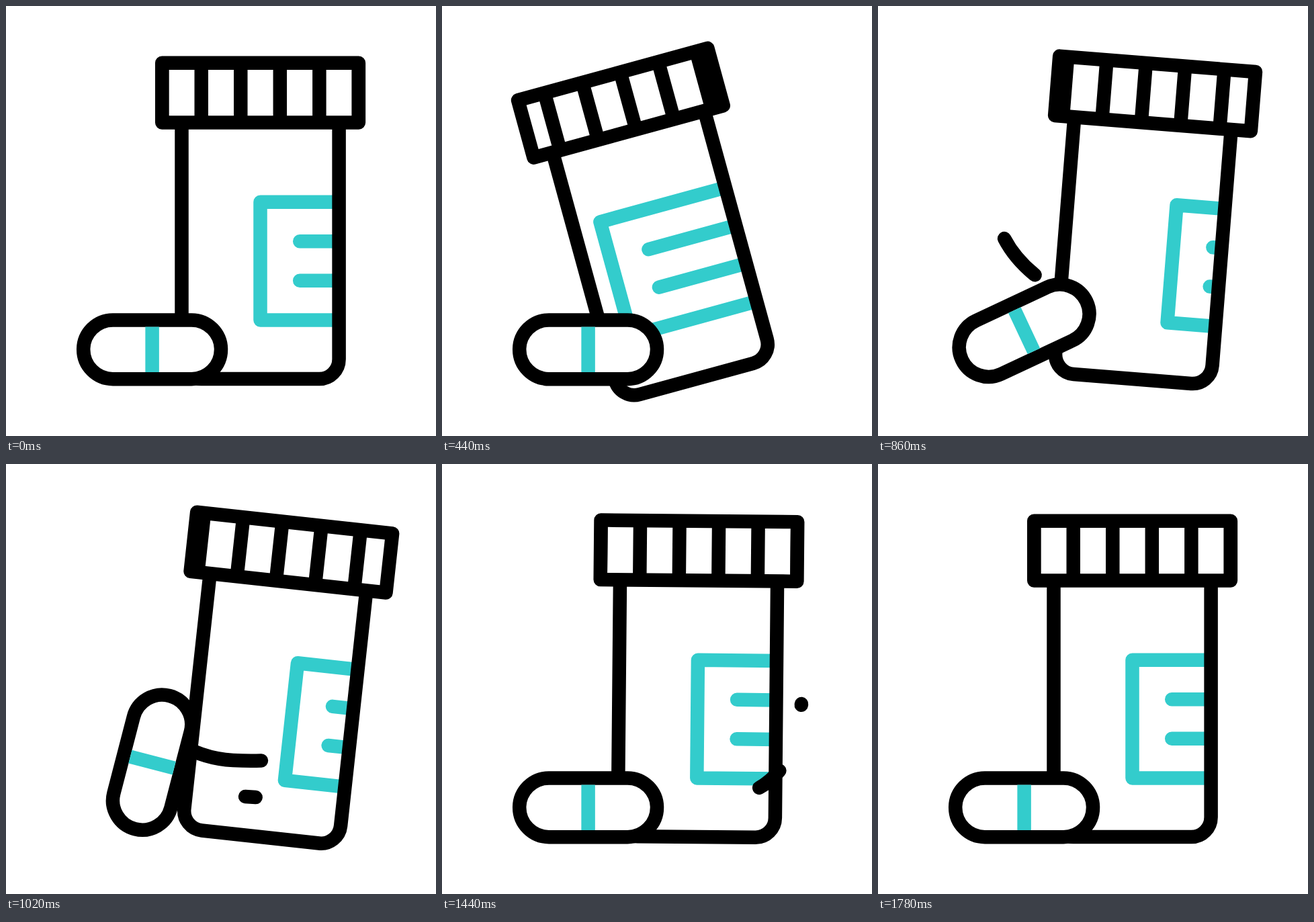
Write an HTML page that moves like this. It is 640 px wide and 640 px high and loops after 2400 ms.

```html
<!DOCTYPE html>
<html lang="en">
<head>
<meta charset="utf-8">
<title>Pill bottle</title>
<style>
  html, body { margin: 0; width: 100%; height: 100%; overflow: hidden; background: #fff; }
  svg { display: block; width: 100vw; height: 100vh; }
  svg * { fill: none; stroke: #000; stroke-width: 20.5; stroke-linejoin: round; }
  svg .teal, .teal * { stroke: #33cccc; }
  .round { stroke-linecap: round; }
</style>
</head>
<body>
<svg viewBox="0 0 640 640">
  <clipPath id="inBody"><rect x="261" y="180" width="235" height="370"/></clipPath>
  <clipPath id="inCap"><rect x="232" y="84" width="293" height="90"/></clipPath>

  <g id="bottle">
    <g clip-path="url(#inBody)">
      <g id="label" class="teal">
        <path d="M680 291.8H378.5V467.4H680"/>
        <path class="round" d="M437.2 350.3H680M437.2 408.8H680"/>
      </g>
    </g>
    <path d="M261.5 173.5V525.7a29.3 29.3 0 0 0 29.3 29.3H466.3a29.3 29.3 0 0 0 29.3-29.3V173.5"/>
    <g clip-path="url(#inCap)"><path id="stripes"/></g>
    <rect x="232.2" y="84.8" width="292.7" height="88.6"/>
  </g>

  <path id="upper" class="round" pathLength="1"
    d="M188 346C200 369 215 385 232 399C262 423 298 439 338 441C400 444 472 438 515 399Q532 383 535 357"/>
  <path id="lower" class="round" pathLength="1"
    d="M356 495Q392 498 427 495.500Q452 492 472 482Q490 472 506 452"/>

  <g id="pill">
    <rect x="-102.4" y="-43.9" width="204.8" height="87.8" rx="43.9" style="fill:#fff"/>
    <path class="teal" d="M0-33.800V33.800"/>
  </g>
</svg>
<script>
const LOOP = 2400, GAP = 58.54;
const el = id => document.getElementById(id);

// Value at time t of a track of [time, value] keys, eased in and out between them
function track(t, keys) {
  if (t <= keys[0][0]) return keys[0][1];
  for (let i = 1; i < keys.length; i++) {
    const [t0, a] = keys[i - 1], [t1, b] = keys[i];
    if (t < t1) {
      const s = (t - t0) / (t1 - t0);
      return a + (b - a) * s * s * (3 - 2 * s);
    }
  }
  return keys[keys.length - 1][1];
}

const tilt = [[10, 0], [579, -18], [944, 8], [1263, -4], [1526, 2], [1780, 0]];
const labelX = [[10, 0], [568, -87.8], [928, 58.5], [1210, -65], [1440, 0]];
const stripeX = [[10, 0], [568, -87.8], [928, 22], [1210, -21.3], [1440, 0]];
const pillTurn = [[683, 0], [1441, -180]];
const pillY = [[683, 511.3], [1117, 434.5], [1441, 511.3]];

// Shows the part of a path between its moving tail and head
function swoosh(id, t, headStart, tailStart) {
  const head = track(t, [[headStart, 0], [headStart + 602, 1]]);
  const tail = track(t, [[tailStart, 0], [tailStart + 522, 1]]);
  const path = el(id);
  path.style.display = head - tail > 0.0005 ? '' : 'none';
  path.setAttribute('stroke-dasharray', `${head - tail} 2`);
  path.setAttribute('stroke-dashoffset', -tail);
}

function draw(t) {
  const move = (id, value) => el(id).setAttribute('transform', value);
  move('bottle', `rotate(${track(t, tilt)} 378.5 555)`);
  move('label', `translate(${track(t, labelX)} 0)`);
  move('stripes', `translate(${track(t, stripeX)} 0)`);
  move('pill', `translate(217.6 ${track(t, pillY)}) rotate(${track(t, pillTurn)})`);
  swoosh('upper', t, 703, 939);
  swoosh('lower', t, 906, 1100);
}

let bars = '';
for (let i = -1; i < 8; i++) bars += `M${232.2 + i * GAP} 80V178`;
el('stripes').setAttribute('d', bars);

const start = performance.now();
function tick() {
  draw((performance.now() - start) % LOOP);
  requestAnimationFrame(tick);
}
tick();
</script>
</body>
</html>
```
